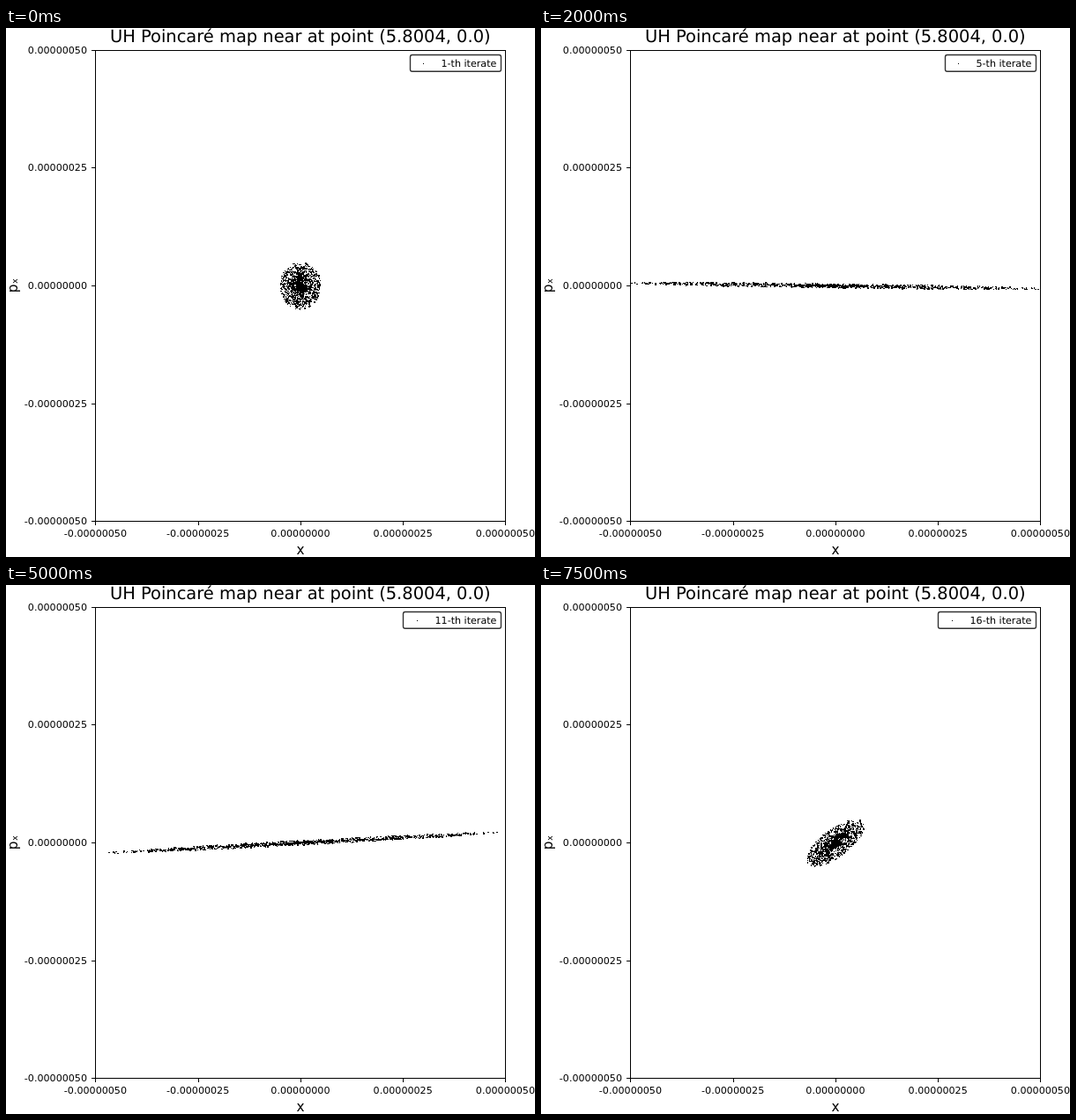
An HTML page with a canvas for the animation above (8000 ms loop, 600 by 600 pixels).

```html
<!DOCTYPE html>
<html lang="en">
<head>
<meta charset="utf-8">
<title>Poincaré map</title>
<style>
  html, body { margin: 0; width: 100%; height: 100%; overflow: hidden; background: #fff; }
  canvas { display: block; }
</style>
</head>
<body>
<canvas id="plot" width="600" height="600"></canvas>
<script>
const ctx = document.getElementById('plot').getContext('2d');

const STEP = 500, STEPS = 16;
const LEFT = 101, RIGHT = 566, TOP = 25, BOTTOM = 559;
const CX = 334, CY = 292.5;
const UNIT_X = (RIGHT - LEFT) / 100, UNIT_Y = (BOTTOM - TOP) / 100;   // pixels per 1e-8
const RADIUS = 5, COUNT = 1200, DOT = 1.39;
const ANGLE = 24.35 * Math.PI / 180;   // rotation per iterate
const STRETCH = 10.8;                  // axis ratio of the invariant ellipses
const TICKS = ['-0.00000050', '-0.00000025', '0.00000000', '0.00000025', '0.00000050'];

let seed = 20117;
function random() {
  seed = (seed + 0x6D2B79F5) | 0;
  let v = Math.imul(seed ^ (seed >>> 15), 1 | seed);
  v = (v + Math.imul(v ^ (v >>> 7), 61 | v)) ^ v;
  return ((v ^ (v >>> 14)) >>> 0) / 4294967296;
}

const points = Array.from({ length: COUNT }, () => {
  const r = RADIUS * random(), a = 2 * Math.PI * random();
  return { x: r * Math.cos(a), p: r * Math.sin(a) };
});

function text(str, x, y, size, align, rendering = 'auto') {
  ctx.font = size + 'px "DejaVu Sans", sans-serif';
  ctx.textAlign = align;
  ctx.textRendering = rendering;
  ctx.fillText(str, x, y);
}

function drawAxes() {
  ctx.fillRect(LEFT, TOP, RIGHT - LEFT + 1, 1);
  ctx.fillRect(LEFT, BOTTOM, RIGHT - LEFT + 1, 1);
  ctx.fillRect(LEFT, TOP, 1, BOTTOM - TOP + 1);
  ctx.fillRect(RIGHT, TOP, 1, BOTTOM - TOP + 1);
  TICKS.forEach((label, i) => {
    const x = 101.4 + 116.25 * i;
    const y = Math.round(559.4 - 133.65 * i);
    ctx.fillRect(Math.round(x), BOTTOM, 1, 5);
    ctx.fillRect(LEFT - 4, y, 5, 1);
    text(label, x, 577, 11.11, 'center');
    text(label, 92, y + 4, 11.11, 'right');
  });
  text('UH Poincaré map near at point (5.8004, 0.0)', 333.8, 16, 19.44, 'center', 'geometricPrecision');
  text('x', 334, 597, 15.28, 'center');
  ctx.save();
  ctx.translate(13, 292);
  ctx.rotate(-Math.PI / 2);
  text('pₓ', 0, 0, 15.28, 'center');
  ctx.restore();
}

// Dots cover whole pixels only, so each is one or two pixels across.
function drawPoints(n) {
  const c = Math.cos(n * ANGLE), s = Math.sin(n * ANGLE);
  ctx.save();
  ctx.beginPath();
  ctx.rect(LEFT, TOP, RIGHT - LEFT + 1, BOTTOM - TOP + 1);
  ctx.clip();
  for (const { x, p } of points) {
    const px = CX - DOT / 2 + UNIT_X * (c * x + STRETCH * s * p);
    const py = CY - DOT / 2 - UNIT_Y * (c * p - s * x / STRETCH);
    const x0 = Math.round(px), y0 = Math.round(py);
    ctx.fillRect(x0, y0, Math.round(px + DOT) - x0, Math.round(py + DOT) - y0);
  }
  ctx.restore();
}

function drawLegend(count) {
  const wide = count > 9;
  const start = wide ? 486.5 : 493.5;
  const edge = wide ? 450.5 : 458.5;
  ctx.beginPath();
  ctx.roundRect(edge, 30.5, 561.5 - edge, 18.7, 2.2);
  ctx.lineWidth = 1.39;
  ctx.strokeStyle = 'rgba(0,0,0,0.8)';
  ctx.stroke();
  ctx.fillRect(Math.floor(start - 20), 40, 1, 1);
  text(count + '-th iterate', start, 44, 11.11, 'left', 'geometricPrecision');
}

function draw(now) {
  const n = Math.floor(now / STEP) % STEPS;
  ctx.fillStyle = '#fff';
  ctx.fillRect(0, 0, 600, 600);
  ctx.fillStyle = '#000';
  drawPoints(n);
  drawAxes();
  drawLegend(n + 1);
}

let begin = null;
function tick(now) {
  if (begin === null) begin = now;
  draw(now - begin);
  requestAnimationFrame(tick);
}
draw(0);
requestAnimationFrame(tick);
</script>
</body>
</html>
```
